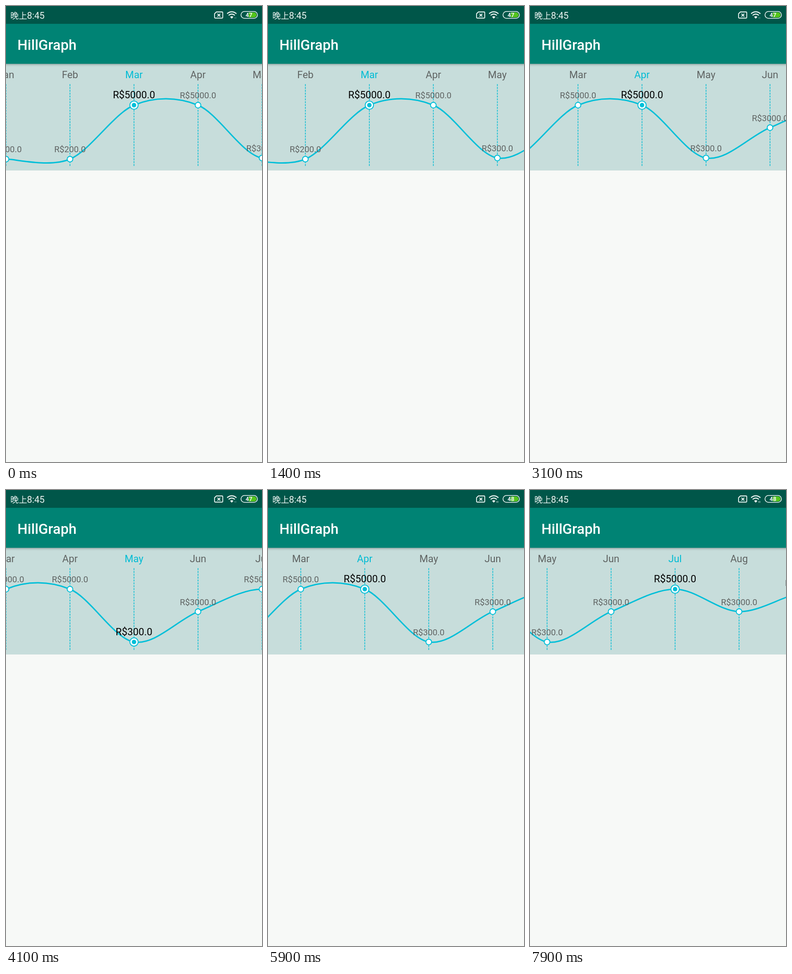
Write an HTML page that moves like this. It is 561 px wide and 998 px high and loops after 8000 ms.

```html
<!DOCTYPE html>
<html lang="en">
<head>
<meta charset="utf-8">
<title>HillGraph</title>
<style>
  html, body { margin: 0; width: 100%; height: 100%; overflow: hidden; background: #f7f9f7; }
  svg { display: block; width: 561px; height: 998px; font-family: Roboto, "Noto Sans CJK SC", "Noto Sans CJK", sans-serif; }
  .time, .icon text { fill: #eef5f3; }
  .icon { fill: none; stroke: #eef5f3; stroke-width: 1.8; stroke-linejoin: round; }
  .title { font-size: 31.2px; font-weight: 500; fill: #fff; }
  .battery { font-size: 13px; font-weight: 700; text-anchor: middle; stroke: none; }
  .curve { fill: none; stroke: #00bfd8; stroke-width: 3; }
  .guide { stroke: #00bcd4; stroke-width: 1.5; stroke-dasharray: 4.16 2.08; }
  .month, .value { text-anchor: middle; fill: #5f6362; }
  .month { font-size: 21.8px; }
  .value { font-size: 18.7px; }
  .ring { fill: #fff; stroke: #00bfd8; stroke-width: 2; r: 6.2px; }
  .core { fill: #00bfd8; r: 0; }
  .on .month { fill: #00bcd4; }
  .on .value { fill: #000; font-size: 21.8px; }
  .on .ring { r: 9.1px; }
  .on .core { r: 4.9px; }
</style>
</head>
<body>
<svg viewBox="0 0 561 998">
  <defs>
    <linearGradient id="shade" x2="0" y2="1">
      <stop offset="0" stop-opacity=".3"/>
      <stop offset=".4" stop-opacity=".1"/>
      <stop offset="1" stop-opacity="0"/>
    </linearGradient>
  </defs>
  <rect width="561" height="998" fill="#f7f9f7"/>
  <rect y="126" width="561" height="234" fill="#c7dddb"/>
  <g id="chart"><path class="curve"/></g>
  <rect y="126" width="561" height="7" fill="url(#shade)"/>
  <rect width="561" height="126.5" fill="#008374"/>
  <rect width="561" height="39" fill="#005649"/>
  <text class="time" x="9.5" y="27.5" font-size="18.4">晚上</text>
  <text class="time" x="46" y="27.5" font-size="20">8:45</text>
  <text class="title" x="25" y="95.5">HillGraph</text>
  <g class="icon">
    <path d="M461 13H473.500Q475 13 475 14.500V25Q475 26.500 473.500 26.500H458.500Q457 26.500 457 25V17Z"/>
    <path d="M463.500 17L469.500 23M469.500 17L463.500 23"/>
    <path d="M484.500 16.800Q494.700 8.500 505 16.800M487.800 20.500Q494.700 14.800 501.600 20.500" stroke-width="2.200"/>
    <path d="M491 23.700Q494.700 20.600 498.400 23.700L494.700 27.800Z" fill="#eef5f3" stroke="none"/>
    <path id="arrows" d="M501.500 24V28M504 24V28" stroke-width="1"/>
    <path d="M532 14H543.500A5.500 5.500 0 0 1 543.500 25H532Z" fill="#55c51c" stroke="none"/>
    <rect x="515" y="12" width="36" height="15" rx="7.500" stroke-width="1.600"/>
    <text id="level" class="battery" x="532.500" y="24.200">47</text>
  </g>
</svg>
<script>
const LOOP = 8000, TICK = 100, STEP = 140.25, SMOOTH = 0.16;
const months = ["Jan", "Feb", "Mar", "Apr", "May", "Jun", "Jul", "Aug", "Sep", "Oct"];
const values = [200, 200, 5000, 5000, 300, 3000, 5000, 3000, 4700, 4700];
// Scroll position: [ms, month index at the centre]
const scroll = [[0, 2], [900, 2.389], [2100, 2.451], [4100, 4], [5900, 3.488], [6900, 5.472], [7900, 5.733]];

const chart = document.getElementById("chart");
const level = document.getElementById("level");
const arrows = document.getElementById("arrows");
const points = values.map((v, i) => ({ x: i * STEP, y: 217 + (5000 - v) * 0.0246 }));

function add(parent, tag, attrs, text = "") {
  const el = document.createElementNS("http://www.w3.org/2000/svg", tag);
  for (const key in attrs) el.setAttribute(key, attrs[key]);
  el.textContent = text;
  return parent.appendChild(el);
}

function curvePath() {
  const at = i => points[Math.max(0, Math.min(points.length - 1, i))];
  let d = `M${points[0].x} ${points[0].y}`;
  for (let i = 1; i < points.length; i++) {
    const a = at(i - 1), b = at(i), before = at(i - 2), after = at(i + 1);
    d += `C${a.x + SMOOTH * (b.x - before.x)} ${a.y + SMOOTH * (b.y - before.y)}`
       + ` ${b.x - SMOOTH * (after.x - a.x)} ${b.y - SMOOTH * (after.y - a.y)} ${b.x} ${b.y}`;
  }
  return d;
}

chart.firstChild.setAttribute("d", curvePath());
const items = points.map(({ x, y }, i) => {
  const g = add(chart, "g", {});
  add(g, "line", { class: "guide", x1: x, x2: x, y1: 171, y2: 352 });
  add(g, "text", { class: "month", x, y: 157.7 }, months[i]);
  add(g, "text", { class: "value", x, y: y - 14.6 }, "R$" + values[i].toFixed(1));
  add(g, "circle", { class: "ring", cx: x, cy: y });
  add(g, "circle", { class: "core", cx: x, cy: y });
  return g;
});

const slope = i => (scroll[i + 1][1] - scroll[i][1]) / (scroll[i + 1][0] - scroll[i][0]);

// Monotone tangent: flat where the drag turns round
function tangent(i) {
  if (i === 0) return slope(0);
  if (i === scroll.length - 1) return slope(i - 1);
  const a = slope(i - 1), b = slope(i);
  return a * b <= 0 ? 0 : 2 * a * b / (a + b);
}

function centreAt(t) {
  let i = 0;
  while (i < scroll.length - 2 && t > scroll[i + 1][0]) i++;
  const [t0, a] = scroll[i], [t1, b] = scroll[i + 1];
  const h = t1 - t0, u = Math.min(1, (t - t0) / h), w = 1 - u;
  return a * w * w * (1 + 2 * u) + b * u * u * (1 + 2 * w)
       + h * u * w * (tangent(i) * w - tangent(i + 1) * u);
}

function draw(now) {
  const t = Math.floor((now % LOOP) / TICK) * TICK;
  const centre = centreAt(t);
  chart.setAttribute("transform", `translate(${280.5 - centre * STEP} 0)`);
  items.forEach((g, i) => g.classList.toggle("on", i === Math.round(centre)));
  level.textContent = t < 4300 ? "47" : "48";
  arrows.style.opacity = t < 4300 ? 0.35 : 0.8;
}

const start = performance.now();
function loop() {
  draw(performance.now() - start);
  requestAnimationFrame(loop);
}
loop();
</script>
</body>
</html>
```
